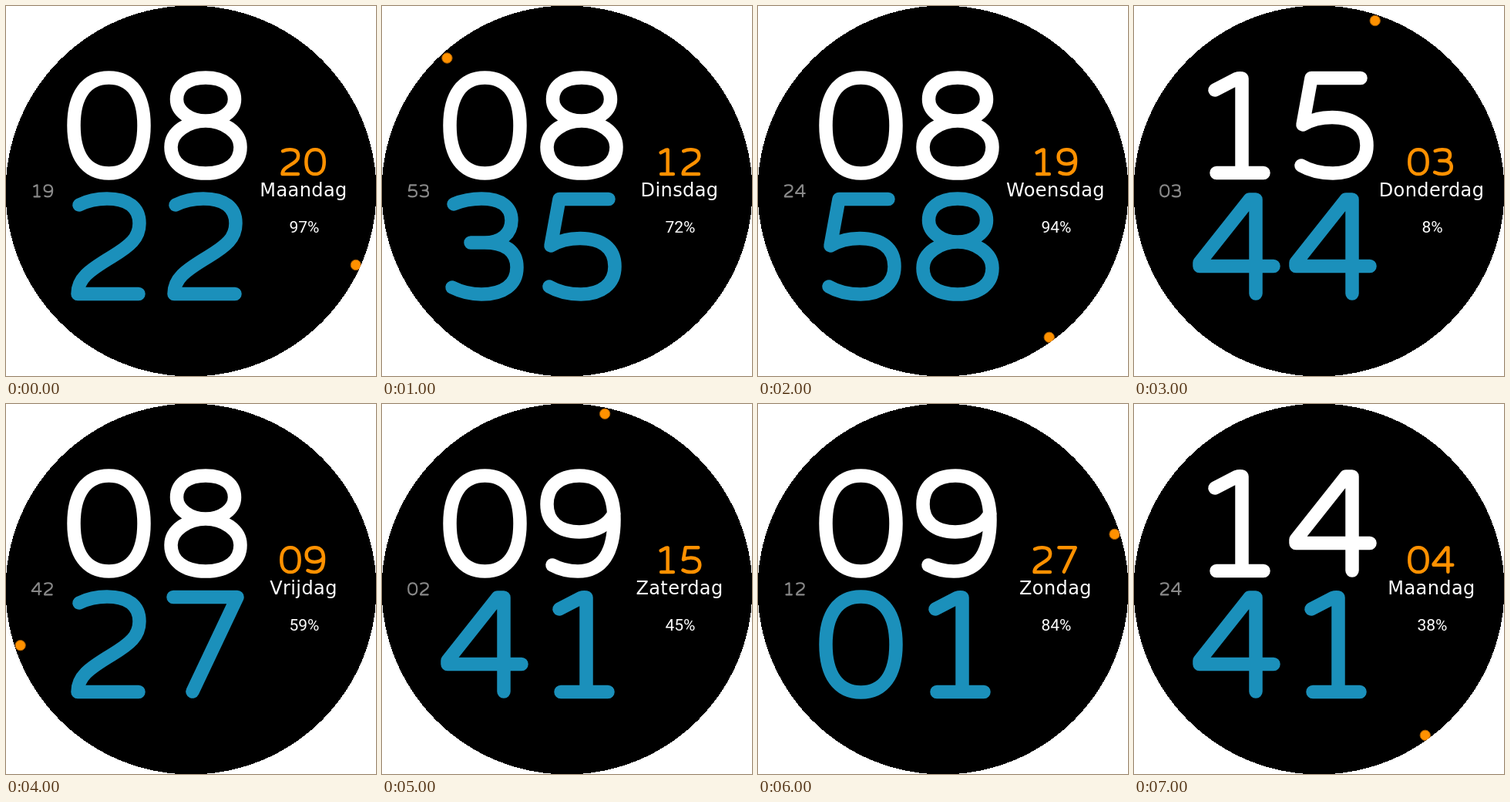
Write an HTML page that moves like this. It is 480 px wide and 480 px high and loops after 8 s.

```html
<!DOCTYPE html>
<html lang="nl">
<head>
<meta charset="utf-8">
<title>Watch face</title>
<style>
html, body { margin: 0; width: 100%; height: 100%; overflow: hidden; background: #fff; }
svg { display: block; width: 480px; height: 480px; }
path { fill: none; stroke-width: 17.5; stroke-linecap: round; stroke-linejoin: round; }
text { fill: #fff; text-anchor: middle; }
#hour { stroke: #fff; }
#minute { stroke: #1b90bb; }
#date { stroke: #ff9100; }
#second { stroke: #888; }
#day { font: 24px "DejaVu Sans", sans-serif; letter-spacing: .4px; }
#battery { font: 21px Roboto, sans-serif; }
#dot { fill: #ff9100; stroke: #a05800; }
</style>
</head>
<body>
<svg viewBox="0 0 480 480">
  <clipPath id="rim"><circle cx="240" cy="240" r="240.5"/></clipPath>
  <circle cx="240" cy="240" r="240.5" shape-rendering="crispEdges"/>
  <g id="hour" transform="translate(71 84)"></g>
  <g id="minute" transform="translate(71 241)"></g>
  <g id="date" transform="translate(352.9 183.9) scale(.257)"></g>
  <g id="second" transform="translate(32.1 231.2) scale(.122)"></g>
  <text id="day" x="386" y="247"></text>
  <text id="battery" x="387" y="294"></text>
  <g clip-path="url(#rim)"><circle id="dot" r="6.7"/></g>
</svg>
<script>
// Digit strokes in a cell 125 wide and 142 high
const DIGITS = {
  0: 'M62.5 9C92 9 108 32 108 71S92 133 62.5 133S17 110 17 71S33 9 62.5 9Z',
  1: 'M34 25L62 10.5Q65 9.5 69 10V132.5M36 132.5H97',
  2: 'M24 17C34 12 46 9 60 9C88 9 102 21 102 41C102 60 90 70 66 84.5C36 102.5 22 113 22 132.5H101',
  3: 'M22 16C34 11 44 9 58 9C84 9 97 20 97 37S84 66 62 66H44M62 66C90 66 104 78 104 98C104 121 86 133 58 133C44 133 32 130 20 124',
  4: 'M110 96.5H14V92L79 10H87V132',
  5: 'M98 9.5H34L23 70C33 64 45 60.5 61 60.5C90 60.5 106 74 106 97C106 120 88 133 62 133C46 133 33 130 21 123',
  7: 'M21 9.5H104L46 132',
  8: 'M63 65C43 65 25.5 53 25.5 37S38 9 63 9S100.5 21 100.5 37S83 65 63 65C85 65 108 79 108 99S92 133 63 133S18 119 18 99S41 65 63 65Z',
  9: 'M25 125C36 131 46 133 58 133C90 133 105 108 105 66C105 30 91 9 60 9C34 9 18 23 18 46C18 69 34 82 60 82C82 82 98 72 105 58'
};

// hour, minute, second, date, weekday, battery
const STATES = [
  ['08', '22', '19', '20', 'Maandag', 97],
  ['08', '35', '53', '12', 'Dinsdag', 72],
  ['08', '58', '24', '19', 'Woensdag', 94],
  ['15', '44', '03', '03', 'Donderdag', 8],
  ['08', '27', '42', '09', 'Vrijdag', 59],
  ['09', '41', '02', '15', 'Zaterdag', 45],
  ['09', '01', '12', '27', 'Zondag', 84],
  ['14', '41', '24', '04', 'Maandag', 38]
];

const $ = id => document.getElementById(id);

function setDigits(id, value) {
  $(id).innerHTML = [...value].map((c, i) =>
    `<path d="${DIGITS[c]}" transform="translate(${i * 125})"/>`).join('');
}

function show([hour, minute, second, date, day, battery]) {
  setDigits('hour', hour);
  setDigits('minute', minute);
  setDigits('second', second);
  setDigits('date', date);
  $('day').textContent = day;
  $('battery').textContent = battery + '%';
  const angle = second * Math.PI / 30;
  $('dot').setAttribute('cx', 240.6 + 233.4 * Math.sin(angle));
  $('dot').setAttribute('cy', 241 - 233.4 * Math.cos(angle));
}

let shown = -1;
function tick() {
  const i = Math.floor(performance.now() / 1000) % STATES.length;
  if (i !== shown) show(STATES[shown = i]);
  requestAnimationFrame(tick);
}
tick();
</script>
</body>
</html>
```
